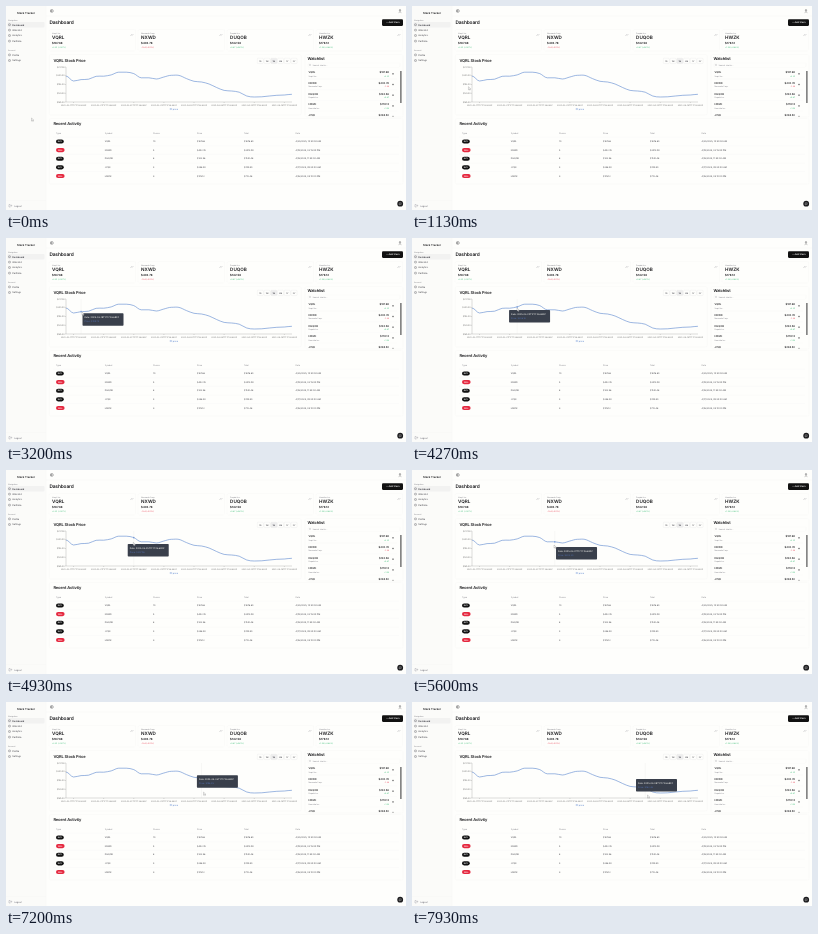
Animation, 400 px wide and 204 px high, one loop 8000 ms. Source, as an HTML page:

```html
<!DOCTYPE html>
<html lang="en">
<head>
<meta charset="utf-8">
<title>Stock dashboard</title>
<style>
html, body { margin: 0; width: 100%; height: 100%; overflow: hidden; background: #fefefc; }
svg { display: block; width: 100vw; height: 100vh; font-family: Inter, Arial, sans-serif; }
text { text-rendering: geometricPrecision; }
</style>
</head>
<body>
<svg id="stage" viewBox="0 0 400 204"></svg>
<script>
const LOOP = 8000;
const PAGE = '#fefefc', INK = '#18181b', MUTED = '#85858c', EDGE = '#ececec';
const GREEN = '#22b566', RED = '#e5283f', BLUE = '#5c86cf';
const stage = document.getElementById('stage');

function add(tag, attrs, parent = stage) {
  const el = document.createElementNS('http://www.w3.org/2000/svg', tag);
  for (const key in attrs) el.setAttribute(key, attrs[key]);
  parent.appendChild(el);
  return el;
}
const rect = (x, y, width, height, fill, more, parent) =>
  add('rect', { x, y, width, height, fill, ...more }, parent);
const path = (d, stroke, width, more, parent) =>
  add('path', { d, stroke, fill: 'none', 'stroke-width': width, ...more }, parent);
function text(x, y, size, str, fill = INK, weight = 400, anchor = 'start', parent) {
  const el = add('text', { x, y, 'font-size': size, fill, 'font-weight': weight, 'text-anchor': anchor }, parent);
  el.textContent = str;
  return el;
}
const title = (x, y, size, str) =>
  text(x, y, size, str, INK, 600).setAttribute('letter-spacing', '-0.025em');
const card = (x, y, w, h) => rect(x, y, w, h, PAGE, { rx: 1.4, stroke: EDGE, 'stroke-width': 0.2 });

const stocks = [
  { code: 'VQRL', name: 'Vaqril Inc.', price: '$187.68', change: '+2.35 (+1.27%)', up: true },
  { code: 'NXWD', name: 'Nexwode Corp.', price: '$402.78', change: '-1.24 (-0.31%)', up: false },
  { code: 'DUQOB', name: 'Duqobi Inc.', price: '$142.56', change: '+0.87 (+0.61%)', up: true },
  { code: 'HWZK', name: 'Hawziko Inc.', price: '$178.12', change: '+1.56 (+0.88%)', up: true },
  { code: 'JYQE', name: 'Jyqeno Inc.', price: '$248.50', change: '-3.20 (-1.27%)', up: false }
];
const tint = stock => stock.up ? GREEN : RED;

function drawSidebar() {
  rect(0, 0, 40, 204, '#fbfbf9');
  path('M40.2 0V204M0 194.5H40M40 10H400', EDGE, 0.2);
  text(20, 7.6, 2.7, 'Stock Tracker', INK, 600, 'middle');
  text(2, 14.6, 1.9, 'Navigation', MUTED);
  text(2, 44.6, 1.9, 'Account', MUTED);
  rect(1.5, 16, 37, 5.4, '#f2f2f1', { rx: 1 });
  const items = [['Dashboard', 19.6], ['Watchlist', 25], ['Analytics', 30.4], ['Portfolio', 36], ['Profile', 49.8], ['Settings', 55.4]];
  items.forEach(([label, y], i) => {
    rect(2.6, y - 1.8, 1.8, 1.8, 'none', { rx: 0.4, stroke: '#3f3f46', 'stroke-width': 0.35 });
    text(6.2, y, 2.3, label, '#3f3f46', i ? 400 : 600);
  });
  path('M4.4 198.5H3V201H4.4M4 199.7H6M5.3 199L6 199.7L5.3 200.4', '#71717a', 0.3);
  text(8.2, 200.7, 2.3, 'Logout', '#71717a');
}

function drawHeader() {
  rect(44.5, 3.8, 2.6, 2.3, 'none', { rx: 0.4, stroke: INK, 'stroke-width': 0.35 });
  path('M45.5 3.8V6.1', INK, 0.3);
  add('circle', { cx: 394, cy: 4.2, r: 0.7, fill: 'none', stroke: INK, 'stroke-width': 0.35 });
  path('M392.7 6.6Q394 4.6 395.3 6.6', INK, 0.35);
  title(43.4, 18.3, 4.8, 'Dashboard');
  rect(376, 13.3, 21, 6.6, '#111', { rx: 1.1 });
  text(387, 17.4, 2.3, '+  Add Stock', '#fff', 500, 'middle');
}

function drawQuotes() {
  stocks.slice(0, 4).forEach((stock, i) => {
    const x = 43.1 + i * 89;
    card(x, 23.5, 86.5, 21.5);
    text(x + 3, 27.8, 1.9, stock.name, MUTED);
    text(x + 3, 32.6, 4.6, stock.code, INK, 600);
    text(x + 3, 38, 2.8, stock.price, INK, 600);
    text(x + 3, 42, 1.9, stock.change, tint(stock));
    path(`M${x + 81.5} 29.6l.9 -.9.7.6 1 -1`, '#71717a', 0.35);
  });
}

function drawWatchlist() {
  card(299, 48.5, 98, 62.5);
  title(301.4, 54.3, 4, 'Watchlist');
  rect(302, 56.8, 92, 4.6, PAGE, { rx: 0.9, stroke: EDGE, 'stroke-width': 0.2 });
  add('circle', { cx: 304, cy: 58.9, r: 0.7, fill: 'none', stroke: MUTED, 'stroke-width': 0.25 });
  text(306.5, 59.8, 2, 'Search stocks...', MUTED);
  const clip = add('clipPath', { id: 'list' });
  rect(300, 62, 96, 48.6, '#fff', {}, clip);
  const list = add('g', { 'clip-path': 'url(#list)' });
  stocks.forEach((stock, i) => {
    const y = 67.2 + i * 10.7;
    text(302.4, y, 2.6, stock.code, INK, 500, 'start', list);
    text(302.4, y + 3.4, 1.9, stock.name, MUTED, 400, 'start', list);
    text(383, y, 2.6, stock.price, INK, 500, 'end', list);
    text(383, y + 3.4, 1.9, stock.change.split(' ')[0], tint(stock), 400, 'end', list);
    path(`M386.2 ${y + 0.6}h1.6m-.8 -.8v1.6`, INK, 0.4, {}, list);
    path(`M302 ${y + 5.8}H391`, EDGE, 0.2, {}, list);
  });
  rect(394, 65, 1.7, 32, '#858585');
}

function drawActivity() {
  card(43.3, 112.6, 353.7, 65.4);
  title(47.4, 119.4, 4, 'Recent Activity');
  const cols = [50, 98.8, 147, 191, 238, 289.5];
  ['Type', 'Symbol', 'Shares', 'Price', 'Total', 'Date'].forEach((label, i) =>
    text(cols[i], 128.1, 2.1, label, MUTED));
  const rows = [
    ['10', '$187.68', '$1876.80', '4/20/2025, 10:30:00 AM'],
    ['5', '$402.78', '$2013.90', '4/19/2025, 02:15:00 PM'],
    ['8', '$142.56', '$1140.48', '4/18/2025, 11:45:00 AM'],
    ['3', '$248.50', '$745.50', '4/17/2025, 09:20:00 AM'],
    ['4', '$178.12', '$712.48', '4/16/2025, 03:10:00 PM']
  ];
  const order = [0, 1, 2, 4, 3];
  rows.forEach((row, i) => {
    const y = 135.5 + i * 8.62, sell = i === 1 || i === 4;
    path(`M47 ${y - 4.3}H393`, EDGE, 0.2);
    rect(50, y - 2.1, sell ? 8.6 : 7.8, 4.2, sell ? RED : '#111', { rx: 2.1 });
    text(sell ? 54.3 : 53.9, y + 0.75, 2, sell ? 'SELL' : 'BUY', '#fff', 600, 'middle');
    [stocks[order[i]].code, ...row].forEach((cell, k) => text(cols[k + 1], y + 0.7, 2.2, cell, '#3f3f46'));
  });
  add('circle', { cx: 394.2, cy: 197.7, r: 2.9, fill: '#1b1b1d' });
  path('M393.2 196.8h2v1.6h-1.2l-.8 .6z', '#fff', 0.3);
}

// Chart
const LEFT = 60, STEP = 7.53, TOP = 61, BASE = 96;
const heights = [70, 75, 73.6, 73.2, 70.3, 70.2, 68.9, 66.2, 66.2, 67.6, 71.8, 71.8, 73, 71, 69.3, 69.4,
  72.6, 75.3, 76, 78, 81.5, 84.4, 85, 86.2, 90, 91, 90.8, 90, 89.3, 89, 88.3];
const pointX = i => LEFT + i * STEP;
const stamp = i => new Date(Date.UTC(2025, 2, 16 + i, 17, 17, 26, 682)).toISOString();

function slope(i) {
  const before = heights[i] - heights[i - 1], after = heights[i + 1] - heights[i];
  return before * after > 0 ? (before + after) / 2 : 0;
}

function drawChart() {
  card(43.3, 48.5, 252, 60.5);
  title(47.4, 56.2, 4, stocks[0].code + ' Stock Price');
  ['1D', '1W', '1M', '3M', '1Y', '5Y'].forEach((label, i) => {
    const x = 251.3 + i * 6.75;
    rect(x, 52.2, 6, 5.4, i === 2 ? '#eeeeee' : PAGE, { rx: 0.9, stroke: '#dededf', 'stroke-width': 0.25 });
    text(x + 3, 55.6, 2, label, '#3f3f46', 500, 'middle');
  });
  path(`M${LEFT} ${TOP}V${BASE}H286`, '#777', 0.25);
  for (let i = 0; i < 5; i++) {
    const y = TOP + i * (BASE - TOP) / 4;
    path(`M${LEFT - 1} ${y}h1`, '#777', 0.25);
    text(LEFT - 1.5, y + 0.7, 2.1, '$' + (217 - i * 12) + '.00', '#666', 400, 'end');
  }
  for (let i = 1; i < 31; i += 4) {
    path(`M${pointX(i)} ${BASE}v1`, '#777', 0.25);
    text(pointX(i), 99.5, 2, stamp(i), '#666', 400, 'middle');
  }
  let d = `M${LEFT} ${heights[0]}`;
  for (let i = 1; i < heights.length; i++) {
    const third = STEP / 3;
    d += `C${pointX(i - 1) + third} ${heights[i - 1] + slope(i - 1) / 3} ${pointX(i) - third} ${heights[i] - slope(i) / 3} ${pointX(i)} ${heights[i]}`;
  }
  path(d, BLUE, 0.6);
  path('M163.6 103h2.6', BLUE, 0.4);
  add('circle', { cx: 164.9, cy: 103, r: 0.5, fill: '#fff', stroke: BLUE, 'stroke-width': 0.3 });
  text(166.8, 103.7, 2.2, 'price', BLUE);
}

drawSidebar();
drawHeader();
drawQuotes();
drawChart();
drawWatchlist();
drawActivity();

const hover = add('g', {});
const guide = path(`M0 ${TOP}V${BASE}`, '#d8d8d8', 0.2, {}, hover);
const dot = add('circle', { r: 0.9, fill: BLUE, stroke: '#fff', 'stroke-width': 0.3 }, hover);
const tip = add('g', {}, hover);
rect(0, 0, 41, 12.4, '#393f4b', { rx: 0.7 }, tip);
const tipDate = text(2, 4.8, 2.2, '', '#f4f4ee', 500, 'start', tip);
const tipPrice = text(2, 9.2, 2.2, '', '#526fae', 400, 'start', tip);
const pointer = path('M0 0V3.1L.8 2.4L1.3 3.5L1.8 3.2L1.3 2.2H2.3Z', '#777', 0.3, { fill: '#fff' });

// Each key is [time, x, y].
const pointerKeys = [[0, 25.5, 112], [70, 25.5, 112], [870, 51, 88], [1300, 60, 76], [2000, 63, 73], [2200, 66, 73],
  [2600, 69, 73], [3200, 76, 74], [3470, 80, 73], [4270, 105, 70], [4800, 124, 72], [5200, 134, 73], [5600, 142, 75],
  [6070, 160, 80], [6470, 177, 85], [6930, 186, 89], [7400, 206, 91], [7800, 229, 93], [7930, 235.5, 93]];
const tipKeys = [[1300, 62, 76], [1800, 62, 74.5], [2200, 66, 74], [2600, 69, 75], [3200, 76.5, 75.3], [3470, 80, 75],
  [4270, 97, 72], [4330, 101, 72], [5200, 131, 75], [5600, 144, 77], [6070, 156, 75], [6470, 172, 72],
  [6930, 180, 72], [7800, 215, 76], [7930, 224, 77]];

function at(keys, t) {
  const next = keys.findIndex(key => key[0] > t);
  if (next === 0) return keys[0].slice(1);
  if (next < 0) return keys[keys.length - 1].slice(1);
  const a = keys[next - 1], b = keys[next], k = (t - a[0]) / (b[0] - a[0]);
  return [a[1] + (b[1] - a[1]) * k, a[2] + (b[2] - a[2]) * k];
}

function render(t) {
  const [x, y] = at(pointerKeys, t);
  pointer.setAttribute('transform', `translate(${x} ${y})`);
  hover.setAttribute('visibility', t < 1300 ? 'hidden' : 'visible');
  const i = Math.max(0, Math.round((x - LEFT) / STEP));
  guide.setAttribute('transform', `translate(${pointX(i)})`);
  dot.setAttribute('cx', pointX(i));
  dot.setAttribute('cy', heights[i]);
  tip.setAttribute('transform', `translate(${at(tipKeys, t).join(' ')})`);
  tipDate.textContent = 'Date: ' + stamp(i);
  tipPrice.textContent = 'Price: $' + (217 - (heights[i] - TOP) * 1.37).toFixed(2);
}

const start = performance.now();
function frame() {
  render((performance.now() - start) % LOOP);
  requestAnimationFrame(frame);
}
frame();
</script>
</body>
</html>
```
